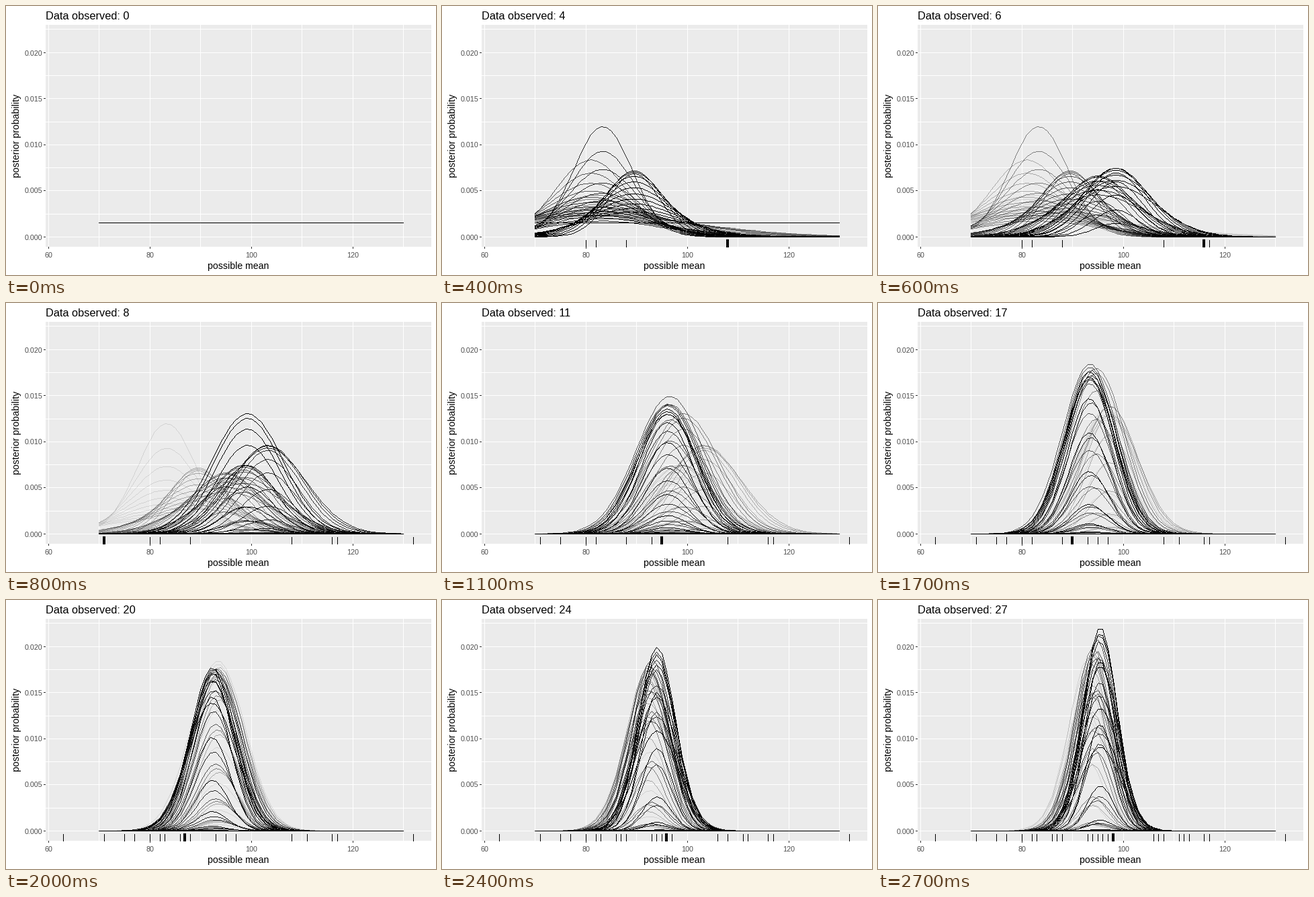
A matplotlib script for the animation above (2800 ms loop, 640x400 px).

```python
import numpy as np
import matplotlib.pyplot as plt
from matplotlib.animation import FuncAnimation
from matplotlib.collections import PolyCollection
from matplotlib.patches import Rectangle

W, H, DPI = 640, 400, 100
PX = 72 / DPI                      # points per pixel
FRAMES, INTERVAL = 28, 100
WAKE, FADE = 5, 5.6                # trailing frames and fade length
SKIPPED = (12, 17)                 # times without a state, blended instead
LEFT, RIGHT, TOP, BOTTOM = 59, 633, 28, 358

DATA = [82, 80, 88, 108, 117, 116, 132, 71, 75, 93, 95, 111, 63, 77,
        97, 83, 86, 87, 94, 106, 112, 96, 113, 107, 98]
MU = np.arange(70, 131)
SIGMA = np.arange(10, 21)

plt.rcParams["font.family"] = "Liberation Sans"


def x_px(v):
    return np.floor(365.1 + 7.55 * (v - 100))


def y_px(v):
    return np.floor(343.3 - 13703 * v)


def posterior(n):
    """Grid posterior of (sigma, mu) after n observations, flat prior."""
    s = SIGMA[:, None]
    log_p = np.zeros((len(SIGMA), len(MU)))
    for d in DATA[:n]:
        log_p += -np.log(s) - (d - MU) ** 2 / (2 * s ** 2)
    p = np.exp(log_p - log_p.max())
    return p / p.sum()


def state(time):
    """Curves, seen data and newest value at one time."""
    n = time - sum(t <= time for t in SKIPPED)
    if time in SKIPPED:
        p = (posterior(n) + posterior(n + 1)) / 2
        return p, DATA[:n], (DATA[n - 1] + DATA[n]) / 2
    return posterior(n), DATA[:n], DATA[n - 1] if n else None


def stroke(row):
    """Outline of a crisp one-pixel line through one density curve."""
    px, py = x_px(MU), y_px(row)
    cols = np.arange(px[0], px[-1] + 1)
    a, b = np.interp(cols - 0.5, px, py), np.interp(cols + 0.5, px, py)
    top, end = np.ceil(np.minimum(a, b)), np.ceil(np.maximum(a, b))
    flat = top >= end
    top[flat] = np.round(np.interp(cols, px, py))[flat]
    end[flat] = top[flat] + 1
    xs = np.column_stack([cols, cols + 1]).ravel()
    upper = np.column_stack([xs, np.repeat(top, 2)])
    lower = np.column_stack([xs, np.repeat(end, 2)])
    return np.vstack([upper, lower[::-1]])


STATES = [state(t) for t in range(FRAMES)]
CURVES = [[stroke(row) for row in s[0]] for s in STATES]

fig = plt.figure(figsize=(W / DPI, H / DPI), dpi=DPI, facecolor="white")
ax = fig.add_axes([0, 0, 1, 1])
ax.set_xlim(0, W)
ax.set_ylim(H, 0)
ax.axis("off")


def box(x, y, w, h, color, z=1):
    ax.add_patch(Rectangle((x, y), w, h, facecolor=color, linewidth=0,
                           antialiased=False, zorder=z))


def label(x, y, s, size, color="black", **kw):
    return ax.text(x, y, s, fontsize=size * PX, color=color, **kw)


def draw_panel():
    box(LEFT, TOP, RIGHT - LEFT, BOTTOM - TOP, "#EBEBEB", 0)
    for v in range(60, 131, 10):
        box(x_px(v), TOP, 1, BOTTOM - TOP, "white")
    for k in range(10):
        box(LEFT, y_px(k * 0.0025), RIGHT - LEFT, 1, "white")
    for v in range(60, 121, 20):
        box(x_px(v), BOTTOM, 1, 3, "#333333")
        label(x_px(v) + 0.5, 374, str(v), 10.8, "#4D4D4D", ha="center")
    for k in range(5):
        y = y_px(k * 0.005)
        box(LEFT - 3, y, 3, 1, "#333333")
        label(54.5, y + 4.5, f"{k * 0.005:.3f}", 10.8, "#4D4D4D", ha="right")
    label(345.5, 391, "possible mean", 14.1, ha="center")
    label(23.5, 193, "posterior probability", 14.1, rotation=90,
          ha="right", va="center")


def tick(v, before=0, after=1, top=348):
    x, end = x_px(v), BOTTOM + 1
    return [(x - before, top), (x + after, top),
            (x + after, end), (x - before, end)]


draw_panel()
title = label(59, 20, "", 16.4)
curves = PolyCollection([], linewidths=0, zorder=3)
rug = PolyCollection([], linewidths=0, facecolors="black", zorder=4)
for c in (curves, rug):
    ax.add_collection(c, autolim=False)


def update(frame):
    shapes, colors = [], []
    for f in range(max(0, frame - WAKE), frame + 1):
        alpha = 1 - (frame - f) / FADE
        shapes += CURVES[f]
        colors += [(0, 0, 0, alpha)] * len(SIGMA)
    curves.set_verts(shapes)
    curves.set_facecolor(colors)
    _, seen, last = STATES[frame]
    ticks = [tick(v) for v in seen]
    if last is not None:
        ticks.append(tick(last, before=2, after=2, top=347))
    rug.set_verts(ticks)
    title.set_text(f"Data observed: {frame}")
    return curves, rug, title


ani = FuncAnimation(fig, update, frames=FRAMES, interval=INTERVAL,
                    repeat=True, repeat_delay=0, blit=False)
plt.show()
```
